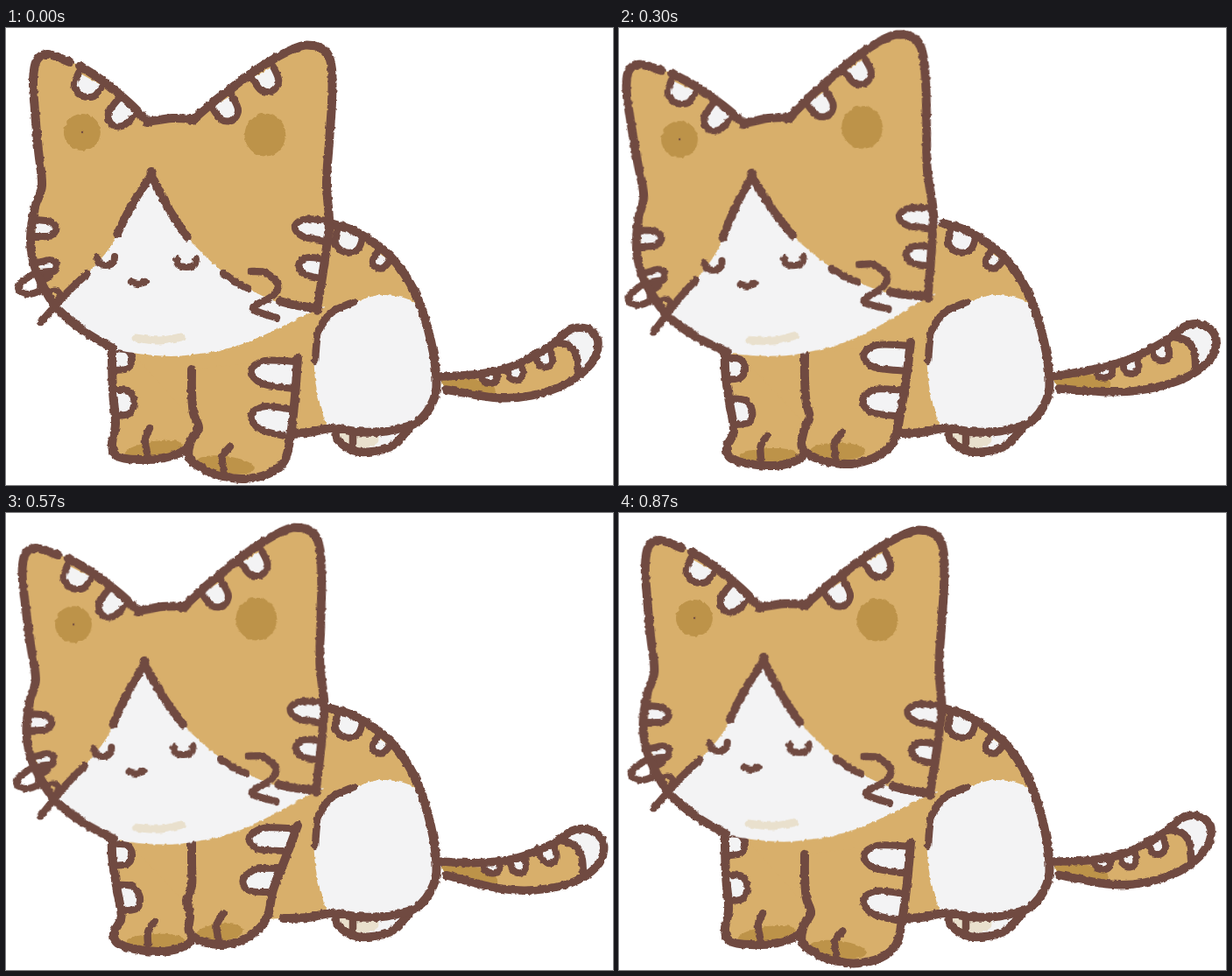
Animation, 693 px wide and 522 px high, one loop 900 ms. Source, as an HTML page:

```html
<!DOCTYPE html>
<html lang="en">
<head>
<meta charset="utf-8">
<title>Kneading cat</title>
<style>
  html, body { margin: 0; width: 100%; height: 100%; overflow: hidden; background: #fff; }
  svg { display: block; width: 693px; height: 522px; }
  path { stroke-linecap: round; stroke-linejoin: round; }
</style>
</head>
<body>
<svg id="stage" viewBox="0 0 693 522" xmlns="http://www.w3.org/2000/svg">
  <filter id="rough" filterUnits="userSpaceOnUse" x="-20" y="-20" width="740" height="570" color-interpolation-filters="sRGB">
    <feTurbulence type="fractalNoise" baseFrequency=".24" numOctaves="1" seed="4"/>
    <feDisplacementMap in="SourceGraphic" scale="4" xChannelSelector="R" yChannelSelector="G"/>
  </filter>
</svg>
<script>
const LINE = '#704a41', FUR = '#d8af6b', DARK = '#bd9349', WHITE = '#f3f3f4', CREAM = '#e9e0cd';
const LOOP = 900, STEP = 30;
const stage = document.getElementById('stage');
const redraws = [];

const clamp = v => Math.max(0, Math.min(1, v));
const bell = (v, center, width) => Math.exp(-(((v - center) / width) ** 2));
const parse = text => text.trim().split(/\s+/).map(s => s.split(',').map(Number));

// The head tilts fast and returns slowly; legs and tail swing in waves
let pose;
function poseAt(t) {
  const wave = (degrees = 0) => Math.cos(2 * Math.PI * (t / LOOP + degrees / 360));
  const lift = (1 - wave()) / 2;
  return {
    headTurn: -4.6 * Math.min(t / 300, (LOOP - t) / 600),
    headDrop: 4 * clamp(.35 + .9 * wave(-245)),
    leftDrop: 14 * lift,
    rightDrop: -24 * lift,
    rightIn: -20 * clamp(.5 - .9 * wave(-50)),
    tailMid: 1 - 9 * wave(-87),
    tailTip: 7 - 15 * wave(-68),
    tailOut: 7.5 * lift
  };
}

// Smooth path through points; a doubled point makes a corner
function curve(p) {
  const f = v => v.toFixed(1);
  let d = 'M' + p[0].map(f);
  for (let i = 0; i < p.length - 1; i++) {
    const a = p[i - 1] || p[i], b = p[i], c = p[i + 1], e = p[i + 2] || c;
    d += 'C' + b.map((v, k) => f(v + (c[k] - a[k]) / 6)) +
         ' ' + c.map((v, k) => f(v - (e[k] - b[k]) / 6)) + ' ' + c.map(f);
  }
  return d;
}

function make(tag, parent, attrs) {
  const el = document.createElementNS('http://www.w3.org/2000/svg', tag);
  for (const k in attrs) el.setAttribute(k, attrs[k]);
  return parent.appendChild(el);
}

// A body part: pens that draw into its own rough-edged group
function part(warp) {
  const outer = make('g', stage, {});
  const group = make('g', outer, { filter: 'url(#rough)' });
  const pen = (shape, fill, width = 0, stroke = LINE) => {
    const points = typeof shape === 'string' ? parse(shape) : shape;
    const el = make('path', group, { fill, stroke: width ? stroke : 'none', 'stroke-width': width });
    const draw = () => el.setAttribute('d', curve(warp ? points.map(p => warp(...p)) : points));
    if (warp) redraws.push(draw); else draw();
  };
  const line = (shape, width = 8.5, stroke) => pen(shape, 'none', width, stroke);

  // U shape between two ends, bulging to the right-hand side of a-b
  const stripe = (ax, ay, bx, by, depth, fill = WHITE) => {
    const len = Math.hypot(bx - ax, by - ay);
    const at = (u, v) => [ax + (bx - ax) * u - (by - ay) / len * depth * v,
                          ay + (by - ay) * u + (bx - ax) / len * depth * v];
    pen([at(0, 0), at(.08, .72), at(.5, 1), at(.92, .72), at(1, 0)], fill, 8);
  };

  const spot = (cx, cy, rx, ry, tilt = 0, fill = DARK) => {
    const points = [];
    for (let i = 0; i <= 12; i++) {
      const a = i * Math.PI / 6, x = rx * Math.cos(a);
      points.push([cx + x, cy + ry * Math.sin(a) + x * tilt]);
    }
    pen(points, fill);
  };
  return { outer, pen, line, stripe, spot };
}

function drawTail() {
  const { pen, line, stripe } = part((x, y) => {
    const u = Math.max(0, (x - 494) / 170);
    const bend = (pose.tailTip - pose.tailMid / .45) / .55;
    return [x + pose.tailOut * u, y + u * (pose.tailTip - bend + bend * u)];
  });
  const outline = '495,398 540,395 580,385 620,363 640,346 655,341 670,346 676,360 668,382 640,405 600,419 560,422 502,413';
  pen(outline, FUR);
  pen('495,400 530,400 556,408 552,421 502,413', DARK);
  pen('628,357 645,364 653,392 668,382 676,360 670,346 655,341 640,346', WHITE);
  stripe(543, 394, 561, 393, 12);
  stripe(572, 389, 589, 385, 15);
  stripe(603, 371, 621, 365, 19);
  line('626,358 642,361 651,372 653,391');
  line(outline, 9.5);
}

function drawBody() {
  const { pen, line, stripe } = part();
  const foot = '377,460 380,472 402,484 438,479 460,458';
  const back = '370,223 400,233 438,260 466,300 482,345 491,395 488,425 468,451 430,461 400,461 372,457 345,462 317,463';
  pen(foot, WHITE);
  pen('380,462 384,474 405,480 424,474 424,462', CREAM);
  line('396,463 396,479');
  line(foot, 9.5);
  pen(back + ' 260,465 195,465 135,400 130,350 300,330 350,230', FUR);
  pen('397,313 430,305 466,314 484,350 491,395 488,425 468,451 430,461 374,457 360,435 352,390 355,350 370,327 397,313', WHITE);
  stripe(378, 230, 408, 238, 23);
  stripe(424, 256, 438, 266, 15);
  line('397,313 372,325 357,346 353,380');
  line(back, 10);
}

function drawLeftLeg() {
  const { pen, line, stripe, spot } = part((x, y) => {
    const roll = clamp((y - 440) / 40) * (1 - clamp((x - 125) / 70));
    return [x + .65 * pose.leftDrop * bell(y, 440, 32), y + pose.leftDrop * (1 - .8 * roll)];
  });
  const outline = '121,345 121,380 122,415 125,452 121,476 127,489 150,493 180,491 202,483 217,466 219,455';
  pen(outline, FUR);
  spot(169, 481, 33, 9, -.15);
  stripe(124, 391, 124, 366, 20);
  stripe(127, 443, 126, 413, 20);
  line('164,457 159,470 161,485');
  line(outline, 10);
}

function drawRightLeg() {
  const { pen, line, stripe, spot } = part((x, y) => {
    const low = clamp((y - 377) / 90), side = low * Math.max(0, (x - 212) / 110);
    const ankle = .6 * bell(x, 219, 7) * bell(y, 457, 14);
    return [x + pose.rightIn * (side + ankle),
            y + pose.rightDrop * (1 + .6 * side - .4 * low) + .5 * pose.rightIn * side];
  });
  const outline = '212,390 212,415 214,440 220,457 211,472 209,490 224,503 248,512 272,515 300,509 318,494 325,465 330,420 333,377';
  pen(outline, FUR);
  spot(251, 499, 33, 10, .12);
  stripe(330, 381, 327, 412, 49);
  stripe(328, 436, 322, 467, 46);
  line('256,478 247,490 249,506');
  line(outline, 10);
}

function drawHead() {
  const { outer, pen, line, stripe, spot } = part();
  const left = '122,366 90,347 60,322 45,300 32,270 28,240 33,205 41,180 37,140 33,95 31,60 35,37 48,30 73,39';
  const right = '84,43 110,60 140,85 162,107 162,107 190,103 214,104 214,104 245,78 290,45 330,23 350,20 366,28 372,47 372,85 369,130 366,178 369,220 366,250 361,285 355,320 355,320 332,317 313,312';
  pen(left + ' ' + right, FUR);
  pen('166,168 166,168 145,200 127,235 114,257 92,281 60,319 60,319 90,347 122,367 122,367 160,373 205,374 270,361 355,321 355,321 313,314 277,298 248,279 207,239 185,203 166,168 166,168', WHITE);
  spot(87, 119, 21, 21);
  spot(296, 122, 23.5, 24.5);
  spot(87, 119, 1.2, 1.2, 0, LINE);
  stripe(83, 51, 110, 66, 21);
  stripe(129, 80, 149, 98, 28);
  stripe(235, 90, 258, 77, 25);
  stripe(281, 57, 305, 44, 24);
  stripe(367, 220, 364, 243, 36);
  stripe(363, 264, 359, 286, 27);
  stripe(33, 238, 34, 219, 24);
  stripe(42, 283, 37, 268, 19);
  line('51,278 34,280 17,291 15,300 25,304 38,300 40,290 50,284', 8);
  line('44,303 56,299 62,305 57,312', 7);
  line('93,280 70,302 52,322 40,336');
  line('127,235 145,200 166,168 166,168 185,205 207,239', 9.5);
  line('248,280 262,290 277,298');
  line('280,278 297,280 311,294 303,307 283,318 287,324 309,331');
  stripe(104, 261, 124, 261, 10, 'none');
  stripe(195, 264, 217, 264, 9, 'none');
  line('143,290 151,292 159,290');
  line('148,354 175,357 200,353', 9, CREAM);
  line(left, 10);
  line(right, 10);
  redraws.push(() => outer.setAttribute('transform',
    `translate(0 ${pose.headDrop}) rotate(${pose.headTurn} 180 345)`));
}

drawTail();
drawBody();
drawLeftLeg();
drawRightLeg();
drawHead();

let shown = -1;
function frame() {
  const t = Math.floor(performance.now() % LOOP / STEP) * STEP;
  if (t !== shown) {
    shown = t;
    pose = poseAt(t);
    redraws.forEach(draw => draw());
  }
  requestAnimationFrame(frame);
}
frame();
</script>
</body>
</html>
```
